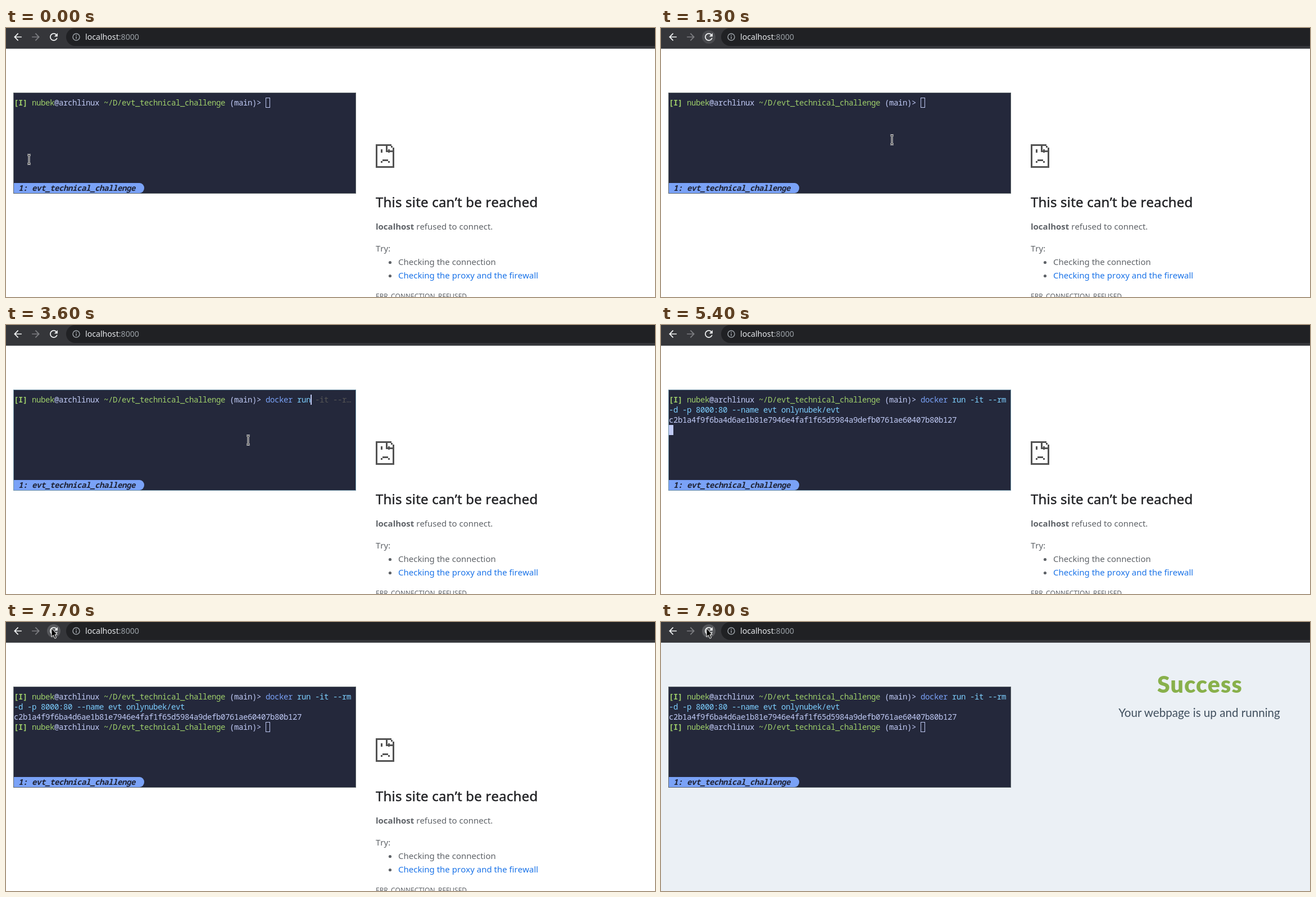
Write an HTML page that moves like this. It is 1155x479 px and loops after 8000 ms.

```html
<!DOCTYPE html>
<html lang="en">
<head>
<meta charset="utf-8">
<title>Local site start</title>
<style>
  html, body { margin: 0; width: 100%; height: 100%; overflow: hidden; background: #fff; }
  svg { display: block; width: 1155px; height: 479px; }
  text { white-space: pre; }
  .page { font: 15px "Noto Sans", "Open Sans", sans-serif; font-kerning: none; fill: #5f6368; }
  .title { font-size: 24px; letter-spacing: .2px; fill: #202124; stroke: #202124; stroke-width: .45px; }
  .lato { font-family: Lato, "Open Sans", sans-serif; text-anchor: middle; }
  .term { font: 14px "Noto Sans Mono", "Liberation Mono", monospace; letter-spacing: -.4px; fill: #c0caf5; }
  .bold { font-weight: 700; }
  .green { fill: #9ece6a; }
  .blue { fill: #7aa2f7; }
  .cyan { fill: #7dcfff; }
  .red { fill: #f7768e; }
  .hint { fill: #555; }
</style>
</head>
<body>
<svg viewBox="0 0 1155 479">
  <defs>
    <path id="back" d="M20 11H7.83l5.59-5.59L12 4l-8 8 8 8 1.41-1.41L7.83 13H20z" transform="scale(.86) translate(-12 -12)"/>
    <path id="beam" d="M-3-8H-1L0-7 1-8H3M0-7V7M-3 8H-1L0 7 1 8H3" fill="none"/>
  </defs>

  <g id="error" class="page">
    <rect y="37" width="1155" height="442" fill="#fff"/>
    <g fill="#535353">
      <path d="M658 207h28v3h2v3h3v36h-33zm3 3v36h27v-25h-12v-11zm18 0v8h9v-5h-3v-3z" fill-rule="evenodd"/>
      <path d="M667 216h3v6h-3zM680 216h3v6h-3zM670 234h10v3h-10zM667 237h3v3h-3zM680 237h3v3h-3z"/>
    </g>
    <text x="658" y="319" class="title">This site can’t be reached</text>
    <text x="658" y="359"><tspan class="bold">localhost</tspan> refused to connect.</text>
    <text x="658" y="398">Try:</text>
    <circle cx="683.5" cy="417.5" r="2.6"/>
    <circle cx="683.5" cy="441.5" r="2.6"/>
    <text x="698" y="422">Checking the connection</text>
    <text x="698" y="446" fill="#1a73e8">Checking the proxy and the firewall</text>
    <text x="658" y="482" font-size="12">ERR_CONNECTION_REFUSED</text>
  </g>

  <g id="success" class="lato">
    <rect y="37" width="1155" height="442" fill="#ebf0f5"/>
    <text x="959" y="125.5" font-size="41" font-weight="900" letter-spacing="1.2" fill="#88b04b">Success</text>
    <text x="958" y="169" font-size="20.6" fill="#404f5e">Your webpage is up and running</text>
  </g>

  <rect width="1155" height="37" fill="#35363a"/>
  <rect y="36" width="1155" height="1" fill="#55575b"/>
  <rect x="107" y="0" width="1080" height="32" rx="16" fill="#202124"/>
  <circle id="hover" cx="85" cy="16" r="12"/>
  <use href="#back" transform="translate(21 16)" fill="#f1f3f4"/>
  <use href="#back" transform="translate(53 16) scale(-1 1)" fill="#7d7e82"/>
  <path transform="translate(85 16) scale(.86) translate(-12 -12)" fill="#f1f3f4" d="M17.65 6.35C16.2 4.9 14.21 4 12 4c-4.42 0-8 3.58-8 8s3.58 8 8 8c3.73 0 6.84-2.55 7.73-6h-2.08c-.82 2.33-3.04 4-5.65 4-3.31 0-6-2.69-6-6s2.69-6 6-6c1.66 0 3.14.69 4.22 1.78L13 11h7V4z"/>
  <g stroke="#9aa0a6" stroke-width="1.5" fill="none">
    <circle cx="125" cy="16" r="6"/>
    <path d="M125 15v4.5M125 12.3v1.6"/>
  </g>
  <text class="page" x="141" y="21" style="font-size:14.15px;fill:#e8eaed">localhost<tspan fill="#9aa0a6">:8000</tspan></text>

  <g class="term">
    <rect id="frame" x="13.5" y="115.5" width="609" height="179" fill="#24283b"/>
    <path d="M14 276h224a8 9 0 0 1 0 18H14z" class="blue"/>
    <text x="22" y="290" class="bold" font-style="italic" fill="#1f2335">1: evt_technical_challenge</text>
    <g id="lines"></g>
    <rect id="caret"/>
  </g>

  <g id="ibeam">
    <use href="#beam" stroke="#fff" stroke-width="3"/>
    <use href="#beam" stroke="#000"/>
  </g>
  <path id="arrow" d="M0 0V15.5L3.4 12.3 5.9 18.3 8.5 17.2 6 11.4H10Z" fill="#000" stroke="#fff" stroke-linejoin="round"/>
</svg>

<script>
const LOOP = 8000, STEP = 100, COL = 8, ROW = 18, LEFT = 14, TOP = 124;
const PROMPT_COLS = 56, ARGS_COLS = 38;
const $ = id => document.getElementById(id);
const span = (cls, s) => `<tspan class="${cls}">${s}</tspan>`;
const show = (el, on) => el.setAttribute('visibility', on ? 'visible' : 'hidden');
const set = (el, attrs) => { for (const k in attrs) el.setAttribute(k, attrs[k]); };

const prompt = span('green bold', '[I]') + span('green', ' nubek') + '@archlinux ' +
  span('green', '~/D/evt_technical_challenge') + ' (main)&gt; ';
const full = 'docker run -it --rm';
const args = '-d -p 8000:80 --name evt onlynubek/evt';
const hash = 'c2b1a4f9f6ba4d6ae1b81e7946e4faf1f65d5984a9defb0761ae60407b80b127';

// [time, number of typed characters]
const typing = [[0, 0], [2400, 1], [2500, 2], [2600, 3], [2700, 4], [2900, 6],
  [3000, 7], [3300, 8], [3400, 9], [3600, 10], [4300, full.length]];

// Mouse runs: start time, then one point per step; the last point holds.
const runs = [
  [0, [41, 234], [46, 231], [92, 214], [163, 180], [215, 138], [208, 92], [160, 54], [112, 27], [88, 14], [81, 11]],
  [1100, [142, 48], [290, 131], [411, 199], [428, 204], [431, 205]],
  [6500, [391, 164], [352, 141], [283, 102], [204, 64], [142, 36], [99, 19], [84, 12], [81, 11]]
];

const latest = (list, t) => list.filter(e => e[0] <= t).pop();

function mouseAt(t) {
  const [start, ...points] = latest(runs, t);
  return points[Math.min(points.length - 1, Math.floor((t - start) / STEP))];
}

function command(n) {
  if (!n) return '';
  const base = n < 8 ? 'docker exec -it ev' : 'docker run -it --r';
  const typed = full.slice(0, n);
  const hint = n < full.length ? span('hint', base.slice(n) + '…') : '';
  return span(n < 6 ? 'red' : 'blue', typed.slice(0, 6)) + span('cyan', typed.slice(6)) + hint;
}

function drawTerminal(t) {
  const n = latest(typing, t)[1];
  const focused = t >= 1500 && t < 7500;
  const rows = [prompt + command(n)];
  let col = PROMPT_COLS + n, row = 0;
  if (t >= 4300) { rows.push(span('cyan', args)); col = ARGS_COLS; row = 1; }
  if (t >= 5400) { rows.push(hash); col = 0; row = 3; }
  if (t >= 5700) { rows.push(prompt); col = PROMPT_COLS; }
  $('lines').innerHTML = rows.map((r, i) =>
    `<text x="${LEFT}" y="${TOP + 14 + i * ROW}">${r}</text>`).join('');

  const x = LEFT + col * COL, y = TOP + row * ROW;
  const block = t >= 5400 && t < 5700;
  set($('caret'), focused
    ? { x, y, width: block ? COL : 2, height: ROW, fill: '#c0caf5', stroke: 'none' }
    : { x: x + .5, y: y + .5, width: COL - 1, height: ROW - 1, fill: 'none', stroke: '#c0caf5' });
  set($('frame'), { stroke: focused ? '#7094a8' : '#5f676a' });
}

function drawMouse(t) {
  const [x, y] = mouseAt(t);
  const inTerminal = x > 13 && x < 623 && y > 115 && y < 295;
  const hidden = t >= 4500 && t < 6500;
  for (const id of ['ibeam', 'arrow']) {
    show($(id), !hidden && (id === 'ibeam') === inTerminal);
    set($(id), { transform: `translate(${x} ${y})` });
  }
  show($('hover'), (t >= 800 && t < 1500) || t >= 7500);
  set($('hover'), { fill: t >= 1100 && t < 1500 ? '#4a4b4f' : '#57585c' });
}

let last = -1;
function tick() {
  const t = Math.floor(performance.now() % LOOP / STEP) * STEP;
  if (t !== last) {
    last = t;
    show($('error'), t < 7800);
    show($('success'), t >= 7800);
    drawTerminal(t);
    drawMouse(t);
  }
  requestAnimationFrame(tick);
}
tick();
</script>
</body>
</html>
```
